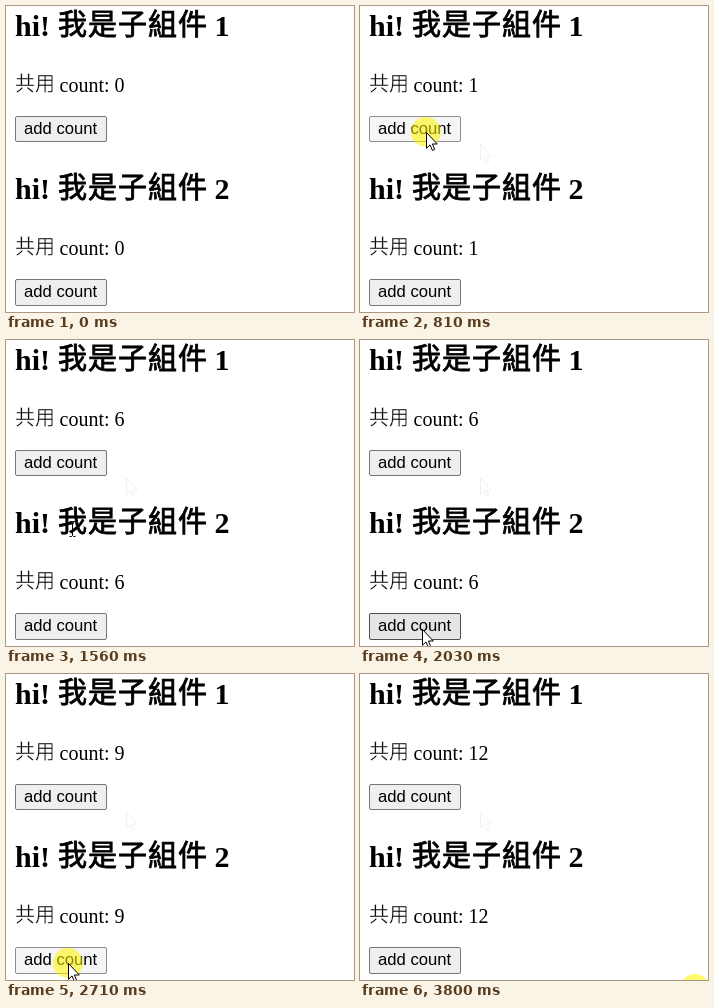
These frames come from a looping animation (348x306 px, 3870 ms). An HTML page:

```html
<!DOCTYPE html>
<html lang="zh-Hant">
<head>
<meta charset="utf-8">
<title>Shared count</title>
<style>
  html, body { margin: 0; width: 100%; height: 100%; overflow: hidden; background: #fff; }
  svg { display: block; width: 348px; height: 306px; }
  text { white-space: pre; }
  .title { font: bold 30px "Liberation Serif", serif; }
  .count { font: 20px "Liberation Serif", serif; }
  .label { font: 16.667px "Liberation Sans", sans-serif; }
  .han { font-family: "Noto Sans CJK TC", "Noto Sans CJK", sans-serif; font-weight: 400; }
  /* Strokes bring the regular weight to semi-bold and to light. */
  .title.han { font-size: 29px; letter-spacing: 1px; stroke: #000; stroke-width: 0.8px; }
  .count.han { font-weight: 300; stroke: #fff; stroke-width: 0.4px; }
</style>
</head>
<body>
<svg id="stage" viewBox="0 0 348 306">
  <rect width="348" height="306" fill="#fff"/>
</svg>
<script>
const LOOP = 3870;
const STEP = 68.6;
const GAP = 163;
const ARROW = "M.5 .5V16.3L4 12.9L6.4 18.4L8.7 17.4L6.4 12H11.3Z";
const BEAM = "M-2.5 -7.5H-.5L.5 -6.5L1.5 -7.5H3.5M.5 -6.5V6.5M-2.5 7.5H-.5L.5 6.5L1.5 7.5H3.5";
const BUTTON = {
  idle: ["#efefef", "#767676"],
  hover: ["#e5e5e5", "#4f4f4f"],
  down: ["#f5f5f5", "#8d8d8d"]
};
// Each click is [press, release]; the count rises on release.
const CLICKS = [
  [610, 740], [810, 880], [950, 1080], [1150, 1220], [1290, 1360], [1420, 1490],
  [2230, 2300], [2360, 2500], [2570, 2640], [2710, 2780], [2850, 2910], [2980, 3050]
];

const stage = document.getElementById("stage");

function add(tag, attrs, parent = stage) {
  const el = document.createElementNS("http://www.w3.org/2000/svg", tag);
  for (const key in attrs) el.setAttribute(key, attrs[key]);
  return parent.appendChild(el);
}

function write(parent, style, x, y, text = "") {
  const el = add("text", { class: style, x, y }, parent);
  el.textContent = text;
  return el;
}

function makeCard(n, height) {
  const g = add("g", { transform: `translate(0 ${(n - 1) * GAP})` });
  write(g, "title", 9, 30, "hi!");
  write(g, "title han", 52, 29, "我是子組件");
  write(g, "title", 208.5, 30, n);
  write(g, "count han", 9, 85, "共用");
  const count = write(g, "count", 53.6, 86);
  const box = add("rect", { x: 9.5, y: 110.5, width: 91, height: height - 1, rx: 1.5 }, g);
  write(g, "label", 18, 128, "add count");
  return { count, box, top: 110 + (n - 1) * GAP, height };
}

const cards = [makeCard(1, 26), makeCard(2, 27)];
const ghost = add("path", { d: ARROW, transform: "translate(120 138)", fill: "#fff", stroke: "#f0f0f0" });
const halo = add("circle", { r: 15, fill: "#fff500", "fill-opacity": 0.56 });
const arrow = add("path", { d: ARROW, fill: "#fff", stroke: "#000" });
const beam = add("path", { d: BEAM, fill: "none", stroke: "#000" });

const mix = (a, b, k) => a + (b - a) * k;
const within = (v, a, b) => v >= a && v < b;

function progress(t, start, steps) {
  return Math.min(1, Math.floor((t - start) / STEP + 0.05) / steps);
}

function pointer(t) {
  if (t < 130) return null;
  if (t < 1560) {
    const k = 1 - progress(t, 130, 6);
    return [mix(66, 160, k ** 3.1), mix(126, 195, k ** 9.6)];
  }
  if (t < 2030) {
    const k = 1 - progress(t, 1490, 4);
    return [66, mix(290, 126, k ** 1.7)];
  }
  if (t < 3200) return [62, 289];
  if (t < 3270) return [112, 291];
  if (t < 3340) return [228, 296];
  return null;
}

function overText([x, y]) {
  return (x < 224 && within(y, 163, 202)) || (x < 119 && within(y, 226, 253));
}

function place(el, p) {
  el.style.display = p ? "" : "none";
  if (p) el.setAttribute("transform", `translate(${Math.round(p[0])} ${Math.round(p[1])})`);
}

function draw(t) {
  const p = pointer(t);
  const pressed = CLICKS.some(([a, b]) => within(t, a, b));
  const total = CLICKS.filter(c => t >= c[1]).length;
  const reading = p && overText(p);

  for (const card of cards) {
    const over = p && within(p[0], 9, 101) && within(p[1], card.top, card.top + card.height);
    const [fill, stroke] = BUTTON[over ? (pressed ? "down" : "hover") : "idle"];
    card.box.setAttribute("fill", fill);
    card.box.setAttribute("stroke", stroke);
    card.count.textContent = `count: ${total}`;
  }

  ghost.style.display = t >= 270 ? "" : "none";
  place(arrow, reading ? null : p);
  place(beam, reading ? p : null);
  place(halo, t >= 3800 ? [335, 315] : pressed ? p : null);
}

const began = performance.now();
function tick() {
  draw((performance.now() - began) % LOOP);
  requestAnimationFrame(tick);
}
draw(0);
requestAnimationFrame(tick);
</script>
</body>
</html>
```
